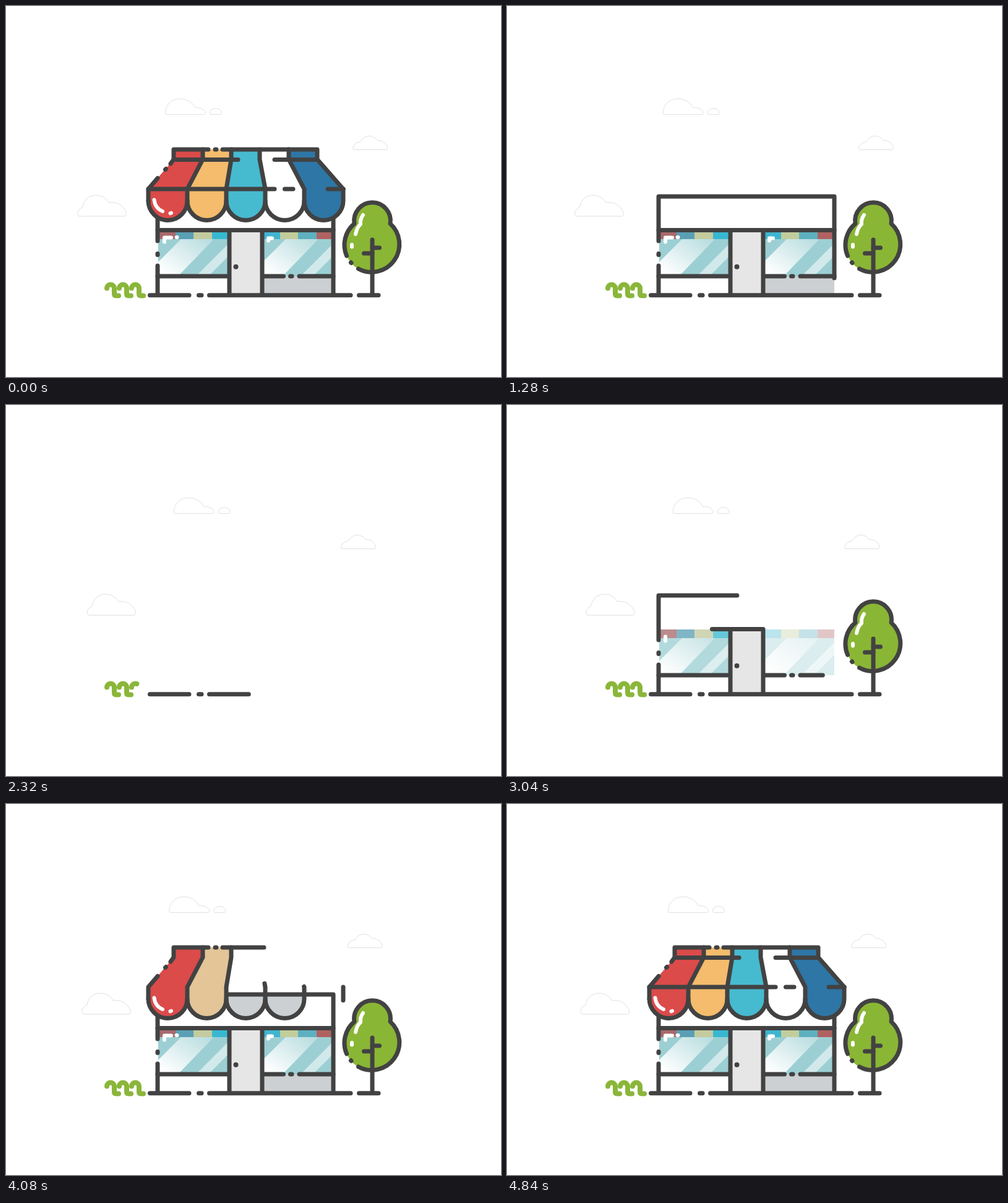
These frames come from a looping animation (800x600 px, 4.88 s). An HTML page:

```html
<!DOCTYPE html>
<html lang="en">
<head>
<meta charset="utf-8">
<title>Little shop</title>
<style>
html, body { margin: 0; width: 100%; height: 100%; overflow: hidden; background: #fff; }
svg { display: block; width: 800px; height: 600px; }
.line { fill: none; stroke: #424242; stroke-width: 7; stroke-linecap: round; stroke-linejoin: round; }
.shine { stroke: #fff; stroke-width: 6; }
.grass { stroke: #8ab63a; stroke-width: 8; }
.cloud { fill: #fff; stroke: #ccc; stroke-width: .6; }
</style>
</head>
<body>
<svg id="stage" viewBox="0 0 800 600">
  <defs>
    <linearGradient id="glare" x1="0" y1="1" x2="1" y2="0">
      <stop offset=".1" stop-color="#fff"/>
      <stop offset="1" stop-color="#fff" stop-opacity=".25"/>
    </linearGradient>
    <clipPath id="wall"><path d="M245 308H529V363H245Z"/></clipPath>
  </defs>
</svg>
<script>
const LOOP = 4880, CLOUD_LOOP = 5540, GREY = '#cdd0d3';
const stage = document.getElementById('stage');
const updates = [];

const clamp = x => Math.max(0, Math.min(1, x));
const span = (time, start, end) => clamp((time - start) / (end - start));
const smooth = u => u * u * (3 - 2 * u);
const easeOut = u => 1 - (1 - u) ** 2;

function add(tag, attrs, parent = stage) {
  const el = document.createElementNS('http://www.w3.org/2000/svg', tag);
  for (const key in attrs) el.setAttribute(key, attrs[key]);
  return parent.appendChild(el);
}

// Draws the pieces one after another, as one pen stroke with gaps.
function draw(start, end, pieces, kind = '') {
  let total = 0;
  const parts = [].concat(pieces).map(d => {
    const el = add('path', { d, class: 'line ' + kind });
    const part = { el, from: total, length: el.getTotalLength() };
    total += part.length;
    return part;
  });
  updates.push(s => {
    const pen = total * easeOut(span(s, start, end));
    for (const { el, from, length } of parts) {
      el.style.display = pen > from ? '' : 'none';
      el.style.strokeDasharray = pen >= from + length ? 'none' : `${Math.max(0, pen - from)} 9999`;
    }
  });
}

// Fades a shape in as grey, then turns it to its colour.
function paint(start, end, color, d) {
  const el = add('path', { d });
  updates.push(s => {
    const u = span(s, start, end);
    el.style.opacity = Math.min(1, u * 2);
    el.style.fill = `color-mix(in srgb, ${color} ${u * u * 100}%, ${GREY})`;
  });
}

function fade(start, end, el) {
  updates.push(s => { el.style.opacity = span(s, start, end); });
  return el;
}

// Clouds: centre x, centre y, speed, outline
const clouds = [
  [290, 162.5, -.0043, 'M-31 13Q-33.5 12-32 6C-27-18 6-18 16 2C24 1 30 5 32.5 9Q33 13 29 13Z'],
  [339, 170.5, -.0043, 'M-8 5Q-10.5 4-9 0C-6-6.5 6-6.5 9 0Q10.5 4 8 5Z'],
  [155, 323, -.0048, 'M-37 17Q-41 14-38 8Q-36 4-31 2C-28-22 3-22 11-5Q15-6 20-5C28-4 36 2 39 11Q40 17 36 17Z'],
  [588.5, 221.5, .006, 'M-26 11Q-29 10-27 5.5Q-24-1-16-1.5C-9-14 4-14 12-4C20-5 29 2 28 9Q28 11 25 11Z']
].map(([x, y, speed, d]) => ({ x, y, speed, el: add('path', { d, class: 'cloud' }) }));

function moveClouds(t) {
  const leaving = t < 1980;
  const age = leaving ? t : t - CLOUD_LOOP;
  const size = leaving ? 1 - smooth(span(t, 1487, 1957)) : smooth(span(t, 2000, 2300));
  for (const { x, y, speed, el } of clouds) {
    el.style.display = size > 0 ? '' : 'none';
    el.setAttribute('transform', `translate(${x + speed * age} ${y}) scale(${size})`);
  }
}

// Grass
draw(2015, 2600, [163, 183, 203].map(x => `M${x} 456.5a6 6 0 0 1 12 0v9q0 3 3 3h4`), 'grass');

// Tree
const HEAD = 'A29.4 29.4 0 1 1 621 352';
paint(2500, 2900, '#8ab635', `M563 352${HEAD}A45 45 0 1 1 563 352Z`);
draw(2690, 2880, 'M559 389.5V386', 'shine');
draw(2720, 2960, 'M577 338Q572 345 573 353Q567 358 565 369', 'shine');
draw(2575, 3030, ['M558 415.5l-.6-.7', `M550.5 404A45 45 0 0 1 563 352${HEAD}A45 45 0 0 1 569.5 425`]);
draw(2615, 2915, 'M592 467.5V378');
draw(2620, 2900, 'M592 391H603.5');
draw(2620, 2900, 'M578.5 400H592');
draw(2560, 2890, 'M570.5 467.7H602');

// Windows
const panes = [
  [0, 2880, 3090, ['#a9696c', '#5a9fb4', '#c3cb9f', '#38b8d0']],
  [169, 2970, 3170, ['#40b5d0', '#c2cd9b', '#5db0c0', '#b06262']]
];
for (const [shift, start, end, goods] of panes) {
  const pane = fade(start, end, add('g', { transform: `translate(${shift})` }));
  add('path', { d: 'M246 363H360V437H246Z', fill: '#9ccfd3' }, pane);
  add('path', { d: 'M246 414L283 377H336L278 437H246Z', fill: 'url(#glare)' }, pane);
  add('path', { d: 'M307 437L360 384V404L327 437Z', fill: '#fff', opacity: .55 }, pane);
  [246, 274, 303, 333].forEach((x, i) =>
    add('rect', { x, y: 363, width: [28, 29, 30, 27][i], height: 14, fill: goods[i] }, pane));
}
draw(3000, 3200, ['M256 381.5V374.5H267', 'M275.5 374h1'], 'shine');
draw(3150, 3300, 'M424 379.5V375.5H430', 'shine');

// Front wall
paint(3200, 3400, GREY, 'M414 437H529V467H414Z');
const bottoms = [230, 293, 356, 419, 482, 545];
const tops = [271, 318, 364, 410, 457, 503];
const shade = add('g', { 'clip-path': 'url(#wall)' });
for (let i = 0; i < 5; i++) {
  const start = i < 4 ? 3850 : 4130;
  fade(start, start + 150, add('path', {
    d: `M${bottoms[i]} 308V315A31.5 31.5 0 0 0 ${bottoms[i + 1]} 315V308Z`, fill: GREY
  }, shade));
}
draw(2760, 3030, 'M245 437H361');
draw(2860, 3190, ['M414 437H448.5', 'M459.5 437H462', 'M474 437H529']);
draw(2850, 3610, ['M245 467.5V420', 'M245 402.5V400.5', 'M245 380V308H529V467.5']);
draw(3000, 3300, 'M361 362.5H245');
draw(3100, 3400, 'M414 362.5H529');

// Door
paint(2590, 2770, '#e6e6e6', 'M361 362.5H414V467H361Z');
const knob = add('circle', { cx: 371.5, cy: 421.8, fill: '#424242' });
updates.push(s => knob.setAttribute('r', 4 * span(s, 2640, 2750)));
draw(2600, 2950, 'M361 467.5V362.5H414V467.5');

// Ground
draw(2100, 2968, ['M232.5 467.7H296', 'M311.5 467.7H316', 'M328.5 467.7H557']);

// Awning
const stripes = [
  ['#db4b4a', 3780, 3980], ['#f4bc6c', 3930, 4130], ['#46bacf', 4130, 4330],
  ['#ffffff', 4080, 4500], ['#2e76a6', 4400, 4600]
];
stripes.forEach(([color, start, end], i) => paint(start, end, color,
  `M${tops[i]} 232V248L${bottoms[i]} 296V315A31.5 31.5 0 0 0 ${bottoms[i + 1]} 315V296L${tops[i + 1]} 248V232Z`));
draw(3880, 4050, ['M239.5 313.5Q241 327 253 332', 'M265.5 335.3l1.5-.6'], 'shine');
[3600, 3680, 3915, 3930].forEach((start, i) => draw(start, start + 385,
  `M${bottoms[i]} 315A31.5 31.5 0 0 0 ${bottoms[i + 1]} 315V296L${tops[i + 1]} 248V232`));
draw(4060, 4280, 'M545 296V315A31.5 31.5 0 0 1 482 315');
draw(3800, 4280, [
  'M230 315V296L245 278.5', 'M257.5 264.5l1-1', 'M266 255L271 248V232H327', 'M338 232h2', 'M350 232H457'
]);
draw(4285, 4630, 'M457 232H503V248L545 296');
draw(4255, 4620, 'M275 248.5H375');
draw(4255, 4620, 'M434 248.5H503');
draw(4250, 4640, 'M230 296H434');
draw(4270, 4600, 'M450.5 296H464');
draw(4260, 4600, 'M545 296H520');

// Build progress: finished, taken apart quickly, then drawn again.
function buildTime(t) {
  if (t < 600) return LOOP;
  return t < 1960 ? 4280 - (t - 920) * 2.32 : t;
}

function render() {
  const t = performance.now() % LOOP;
  const s = buildTime(t);
  moveClouds(t);
  updates.forEach(update => update(s));
  requestAnimationFrame(render);
}
render();
</script>
</body>
</html>
```
